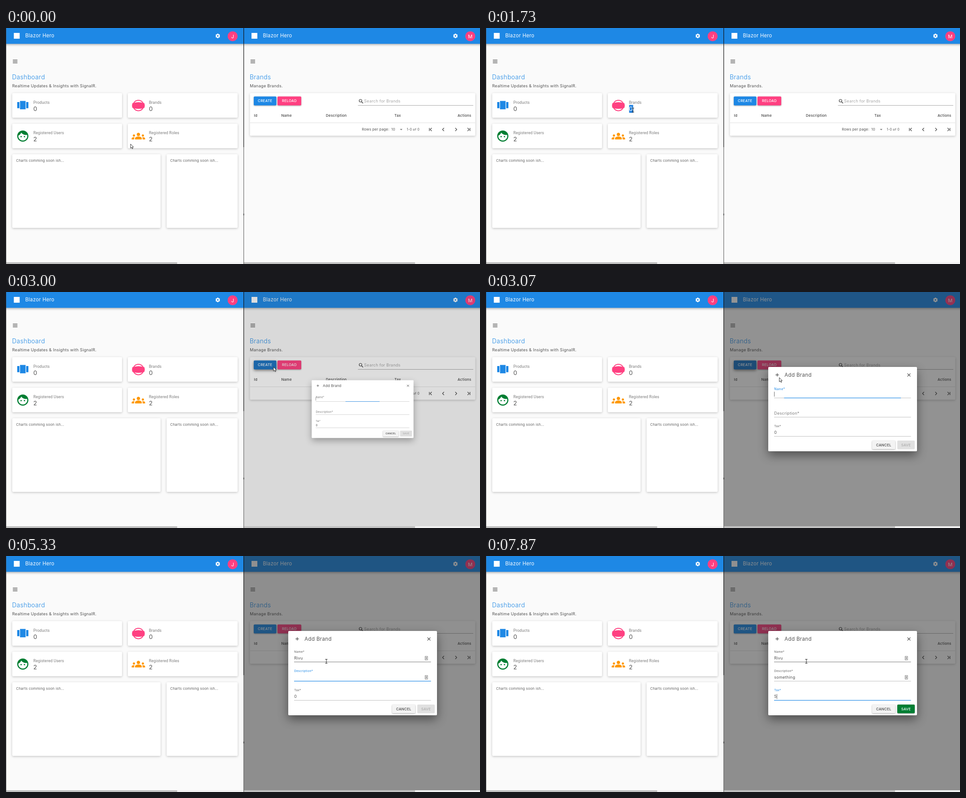
These frames come from a looping animation (1058 by 529 pixels, 8000 ms). An HTML page with a canvas:

```html
<!DOCTYPE html>
<html lang="en">
<head>
<meta charset="utf-8">
<title>Dashboard and brands</title>
<style>
html, body { margin: 0; width: 100%; height: 100%; overflow: hidden; background: #fafafa; }
canvas { display: block; }
</style>
</head>
<body>
<canvas id="stage" width="1058" height="529"></canvas>
<script>
const ctx = document.getElementById('stage').getContext('2d');
const LOOP = 8000, FPS = 15;
const BLUE = '#1e88e5', PINK = '#ff4081', GREEN = '#007e33', ORANGE = '#ff9800';
const INK = '#424242', SOFT = '#525252', GREY = '#7d7d7d';

const clamp = v => Math.max(0, Math.min(1, v));
const mix = (a, b, u) => a + (b - a) * u;
const between = (t, a, b) => t >= a && t < b;
const ramp = (t, start) => 1 - (1 - clamp((t - start) / 200)) ** 3;
const smooth = u => u * u * (3 - 2 * u);

// y is the middle of the capitals
function text(str, x, y, size, color = SOFT, { weight = 400, align = 'left', font = 'Inter' } = {}) {
  ctx.font = `${weight} ${size}px ${font}, sans-serif`;
  ctx.letterSpacing = size * (font === 'Inter' ? 0.03 : 0.01) + 'px';
  ctx.textAlign = align;
  ctx.fillStyle = color;
  ctx.fillText(str, x, y + size * 0.36);
  return ctx.measureText(str).width;
}

function rect(x, y, w, h, color) {
  ctx.fillStyle = color;
  ctx.fillRect(x, y, w, h);
}

function disc(x, y, r, color) {
  ctx.fillStyle = color;
  ctx.beginPath();
  ctx.arc(x, y, r, 0, 7);
  ctx.fill();
}

function line(points, color = INK, width = 1.2) {
  ctx.strokeStyle = color;
  ctx.lineWidth = width;
  ctx.beginPath();
  points.forEach(p => ctx.lineTo(...p));
  ctx.stroke();
}

// canvas shadows ignore the transform, so they are scaled here
function panel(x, y, w, h, color = '#fff', blur = 5, drop = 1.5, alpha = 0.22) {
  const scale = ctx.getTransform().a;
  ctx.save();
  ctx.shadowColor = `rgba(0,0,0,${alpha})`;
  ctx.shadowBlur = blur * scale;
  ctx.shadowOffsetY = drop * scale;
  ctx.fillStyle = color;
  ctx.beginPath();
  ctx.roundRect(x, y, w, h, 2);
  ctx.fill();
  ctx.restore();
}

function button(label, x, y, w, h, fill, color, raised = true, hover = false) {
  panel(x, y, w, h, fill, hover ? 6 : 3, hover ? 2.5 : 1, raised ? (hover ? 0.5 : 0.35) : 0);
  text(label, x + w / 2, y + h / 2, 8, color, { weight: 500, align: 'center' });
}

// ---- icons ----
function svgIcon(d, x, y, color) {
  ctx.save();
  ctx.translate(x, y);
  ctx.scale(1.25, 1.25);
  ctx.fillStyle = color;
  ctx.fill(new Path2D(d));
  ctx.restore();
}

function gear(x, y) {
  for (let i = 0; i < 3; i++) {
    const a = Math.PI * (i / 3 + 1 / 6), dx = 5 * Math.cos(a), dy = 5 * Math.sin(a);
    line([[x - dx, y - dy], [x + dx, y + dy]], '#fff', 3);
  }
  disc(x, y, 4, '#fff');
  disc(x, y, 1.8, BLUE);
}

function bandIcon(x, y) {
  ctx.strokeStyle = PINK;
  ctx.lineWidth = 2;
  ctx.beginPath();
  ctx.arc(x, y, 11.8, 0, 7);
  ctx.stroke();
  ctx.fillStyle = PINK;
  ctx.beginPath();
  ctx.moveTo(x - 13.5, y - 5);
  ctx.quadraticCurveTo(x, y - 10, x + 13.5, y - 5);
  ctx.quadraticCurveTo(x + 15, y, x + 13.5, y + 5);
  ctx.quadraticCurveTo(x, y + 10, x - 13.5, y + 5);
  ctx.quadraticCurveTo(x - 15, y, x - 13.5, y - 5);
  ctx.fill();
}

const FACE = 'M9 11.75a1.25 1.25 0 1 0 .01 0zm6 0a1.25 1.25 0 1 0 .01 0zM12 2C6.48 2 2 6.48 2 12s4.48 10 10 10 10-4.48 10-10S17.52 2 12 2zm0 18c-4.41 0-8-3.59-8-8 0-.29.02-.58.05-.86 2.36-1.05 4.23-2.98 5.21-5.37C11.07 8.33 14.05 10 17.42 10c.78 0 1.53-.09 2.25-.26.21.71.33 1.47.33 2.26 0 4.41-3.59 8-8 8z';
const CAROUSEL = 'M7 19h10V4H7zM2 17h4V6H2zM18 6v11h4V6z';
const GROUP = 'M12 12.75c1.63 0 3.07.39 4.24.9 1.08.48 1.76 1.56 1.76 2.73V18H6v-1.61c0-1.18.68-2.26 1.76-2.73 1.17-.52 2.61-.91 4.24-.91zM12 6a3 3 0 1 0 .01 0zM4 9a2 2 0 1 0 .01 0zM20 9a2 2 0 1 0 .01 0zM5.13 14.1C3.7 13.85 2.3 14.1 1.22 14.58.48 14.9 0 15.62 0 16.43V18h4.5v-1.61c0-.83.23-1.61.63-2.29zM18.87 14.1c1.43-.25 2.83 0 3.91.48.74.32 1.22 1.04 1.22 1.85V18h-4.5v-1.61c0-.83-.23-1.61-.63-2.29z';

function chevron(x, dir, bar) {
  line([[x - 1.7 * dir, 224], [x + 1.7 * dir, 227.5], [x - 1.7 * dir, 231]]);
  if (bar) line([[x + 3.6 * dir, 224], [x + 3.6 * dir, 231]]);
}

// ---- pages ----
function page(x, w, initial, title, subtitle) {
  rect(x, 0, w, 529, '#fafafa');
  ctx.save();
  ctx.beginPath();
  ctx.rect(x, 0, w, 529);
  ctx.clip();
  panel(x - 9, -5, w + 18, 40.4, BLUE, 5, 2, 0.3);
  ctx.restore();
  rect(x + 17.5, 11, 13, 13, '#fff');
  text('Blazor Hero', x + 43, 17.5, 11.1, '#fff');
  gear(x + 472.7, 17.7);
  disc(x + 505.8, 18.4, 11, PINK);
  text(initial, x + 506, 18.6, 11, '#fff', { align: 'center' });
  for (const y of [71.8, 75, 78.2]) line([[x + 15.3, y], [x + 25.5, y]]);
  text(title, x + 13.5, 110, 13.8, BLUE, { weight: 300 });
  text(subtitle, x + 13.8, 130, 9.05);
}

function stat(x, y, label, value) {
  panel(x, y, 245, 55);
  text(label, x + 47, y + 20.5, 8.9, GREY, { font: 'Roboto' });
  text(value, x + 47, y + 35, 13.4);
}

function dashboard(t) {
  page(0, 530, 'J', 'Dashboard', 'Realtime Updates & Insights with SignalR.');
  stat(14, 146, 'Products', '0');
  stat(272, 146, 'Brands', '0');
  stat(14, 214.5, 'Registered Users', '2');
  stat(272, 214.5, 'Registered Roles', '2');
  svgIcon(CAROUSEL, 22.5, 158.5, BLUE);
  bandIcon(295.5, 173.7);
  svgIcon(FACE, 22.5, 227.3, GREEN);
  svgIcon(GROUP, 280.5, 227.3, ORANGE);
  if (between(t, 930, 2130)) {
    rect(319.5, 172.5, 9, 17.5, '#1e7fe0');
    text('0', 319, 181, 13.4, '#fff');
  }
  panel(14, 283, 331, 165);
  panel(358.5, 283, 158.5, 165);
  for (const x of [22.5, 366.5]) text('Charts comming soon ish...', x, 297, 7.86, '#616161');
}

function brands(t) {
  page(530.5, 527.5, 'M', 'Brands', 'Manage Brands.');
  panel(544.5, 146, 503, 95.5);
  const onCreate = between(t, 2700, 3130), onReload = between(t, 2530, 2700);
  button('CREATE', 553, 153.5, 50.5, 20, onCreate ? '#1b73c2' : BLUE, '#fff', true, onCreate);
  button('RELOAD', 606, 153.5, 53, 20, onReload ? '#e63974' : PINK, '#fff', true, onReload);
  ctx.strokeStyle = INK;
  ctx.lineWidth = 1.2;
  ctx.beginPath();
  ctx.arc(791.3, 163, 3, 0, 7);
  ctx.stroke();
  line([[793.5, 165.2], [797, 168.7]], INK, 1.6);
  text('Search for Brands', 799.3, 164, 9, '#a5a5a5');
  rect(785.5, 173, 257.5, 1, '#a8a8a8');
  const heads = [['Id', 553.5], ['Name', 614.5], ['Description', 714], ['Tax', 867], ['Actions', 1008]];
  for (const [label, x] of heads) text(label, x, 196.5, 8, INK, { weight: 500 });
  rect(544.5, 212, 503, 1, '#e0e0e0');
  text('Rows per page:', 794.3, 227.5, 7.86);
  text('10', 860, 227.5, 7.86);
  text('1-0 of 0', 894.5, 227.5, 7.3);
  ctx.fillStyle = GREY;
  ctx.beginPath();
  ctx.moveTo(879.3, 226.3);
  ctx.lineTo(884.9, 226.3);
  ctx.lineTo(882.1, 229.2);
  ctx.fill();
  chevron(948.5, -1, true);
  chevron(976, -1);
  chevron(1004.5, 1);
  chevron(1032, 1, true);
}

// ---- dialog ----
function field({ label, y, value = '', float, focus, caret, hover, icon, selected }) {
  const active = focus > 0.5;
  text(label, 643.2, mix(y, y - 14, float), mix(9, 6.7, float), active ? BLUE : float === 1 ? '#616161' : GREY);
  if (selected) rect(643, y - 5, 7.5, 10.5, '#1e7fe0');
  const width = text(value, 643.2, y, 9, selected ? '#fff' : SOFT);
  if (caret) rect(643.3 + width, y - 5.5, 0.8, 11, '#444');
  rect(643, y + 8, 305.5, 1, hover ? '#7a7a7a' : '#c0c0c0');
  rect(795.7 - 152.7 * focus, y + 7.9, 305.4 * focus, 1.2, BLUE);
  if (icon) {
    ctx.strokeStyle = GREY;
    ctx.lineWidth = 1;
    ctx.strokeRect(935.5, y - 4, 5.5, 8);
    line([[937, y - 1.6], [939.6, y - 1.6]], GREY, 1.2);
    line([[937, y + 0.8], [939.6, y + 0.8]], GREY, 1.2);
    rect(937.7, y - 2, 1.2, 4.5, GREY);
  }
}

const typed = (str, times, t) => str.slice(0, times.filter(at => t >= at).length);

function dialog(t) {
  const open = clamp((t - 2952) / 100);
  if (!open) return;
  const shade = smooth(clamp((t - 2952) / 130)) * 0.498;
  rect(531, 0, 527, 525, `rgba(33,33,33,${shade})`);
  const scale = Math.sin(open * Math.PI / 2);
  ctx.save();
  ctx.translate(796, 262.5);
  ctx.scale(scale, scale);
  ctx.translate(-796, -262.5);
  panel(630, 168, 332, 189, '#fff', 22, 9, 0.45 * scale);
  line([[646.2, 185.8], [653.8, 185.8]]);
  line([[650, 182], [650, 189.6]]);
  text('Add Brand', 666.3, 186, 11.5);
  line([[940.7, 182.7], [947.3, 189.3]]);
  line([[947.3, 182.7], [940.7, 189.3]]);

  const toName = ramp(t, 2972), toDesc = ramp(t, 4790), toTax = ramp(t, 6990);
  field({
    label: 'Name*', y: 229, value: typed('Rivu', [4060, 4330, 4460, 4600], t),
    float: toName, focus: toName * (1 - toDesc), hover: t > 3260, icon: t > 3795,
    caret: between(t, 2990, 3530) || between(t, 4060, 4790)
  });
  field({
    label: 'Description*', y: 272,
    value: typed('something', [5800, 5930, 6130, 6260, 6460, 6530, 6730, 6800, 6800], t),
    float: toDesc, focus: toDesc * (1 - toTax), icon: t > 4790,
    caret: between(t, 4790, 5325) || between(t, 5795, 6990)
  });
  field({
    label: 'Tax*', y: 315, value: t < 7860 ? '0' : '5', float: 1, focus: toTax,
    selected: between(t, 6990, 7860), caret: t >= 7860
  });

  button('CANCEL', 862, 333, 51.5, 19.5, '#f3f3f3', INK);
  const ready = clamp((t - 7230) / 250);
  const tone = (a, b) => `rgb(${a.map((v, i) => mix(v, b[i], ready))})`;
  button('SAVE', 918, 333, 39, 19.5, tone([224, 224, 224], [0, 126, 51]),
    tone([172, 172, 172], [255, 255, 255]), ready > 0);
  ctx.restore();
}

// ---- pointer ----
const SHAPES = {
  arrow: 'M0 0V9.4L2.2 7.4L3.8 10.8L5.3 10.1L3.8 6.9H6.6Z',
  hand: 'M-1 1Q0-.6 1 1V4.5L5 5.6V8.5L4 11.5H-1.2L-4 7L-3 6.2L-1 7.5Z'
};
const PATH = [
  [0, 278, 260, 'arrow'], [60, 279, 259, 'arrow'], [330, 305, 215, 'arrow'], [530, 321, 186, 'ibeam'],
  [600, 323, 182, 'ibeam'], [800, 323, 182, 'ibeam'], [1130, 343, 190, 'ibeam'], [1270, 343, 190, 'ibeam'],
  [1400, 333, 188, 'ibeam'], [1670, 333, 188, 'ibeam'], [1733, 328, 184, 'ibeam'], [1800, 329, 185, 'ibeam'],
  [1940, 329, 185, 'ibeam'], [2070, 350, 188, 'arrow'], [2400, 530, 188, 'arrow'], [2530, 622, 170, 'hand'],
  [2670, 608, 167, 'hand'], [2800, 581, 164, 'hand'], [2933, 579, 163, 'hand'], [3000, 597, 168, 'arrow'],
  [3067, 655, 192, 'arrow'], [3260, 708, 238, 'ibeam'], [3600, 715, 236, 'ibeam'], [LOOP, 715, 236, 'ibeam']
];

function pointer(t) {
  const i = Math.max(1, PATH.findIndex(k => k[0] > t));
  const [t0, x0, y0, shape] = PATH[i - 1], [t1, x1, y1] = PATH[i];
  const u = (t - t0) / (t1 - t0);
  ctx.save();
  ctx.translate(mix(x0, x1, u), mix(y0, y1, u));
  if (shape === 'ibeam') {
    line([[0, -4.5], [0, 4.5]], '#222', 1);
    for (const y of [-4.5, 4.5]) line([[-2.5, y], [2.5, y]], '#222', 1);
  } else {
    const p = new Path2D(SHAPES[shape]);
    ctx.fillStyle = '#fff';
    ctx.strokeStyle = '#222';
    ctx.lineWidth = 0.9;
    ctx.fill(p);
    ctx.stroke(p);
  }
  ctx.restore();
}

function edges() {
  rect(0, 525, 530, 4, '#f1f1f1');
  rect(0, 525, 382, 4, '#c1c1c1');
  rect(531, 525, 527, 4, '#f1f1f1');
  rect(531, 525, 382, 4, '#c1c1c1');
  rect(0, 0, 1, 529, 'rgba(70,70,70,.55)');
  rect(530, 0, 1.2, 267, '#111');
  rect(530, 267, 1.2, 262, '#6a6a6a');
  rect(530, 416, 1.2, 4, '#111');
}

const start = performance.now();
function frame() {
  const elapsed = (performance.now() - start) % LOOP;
  const t = Math.floor((elapsed + 5) * FPS / 1000) * 1000 / FPS % LOOP;
  dashboard(t);
  brands(t);
  dialog(t);
  edges();
  pointer(t);
  requestAnimationFrame(frame);
}
frame();
</script>
</body>
</html>
```
